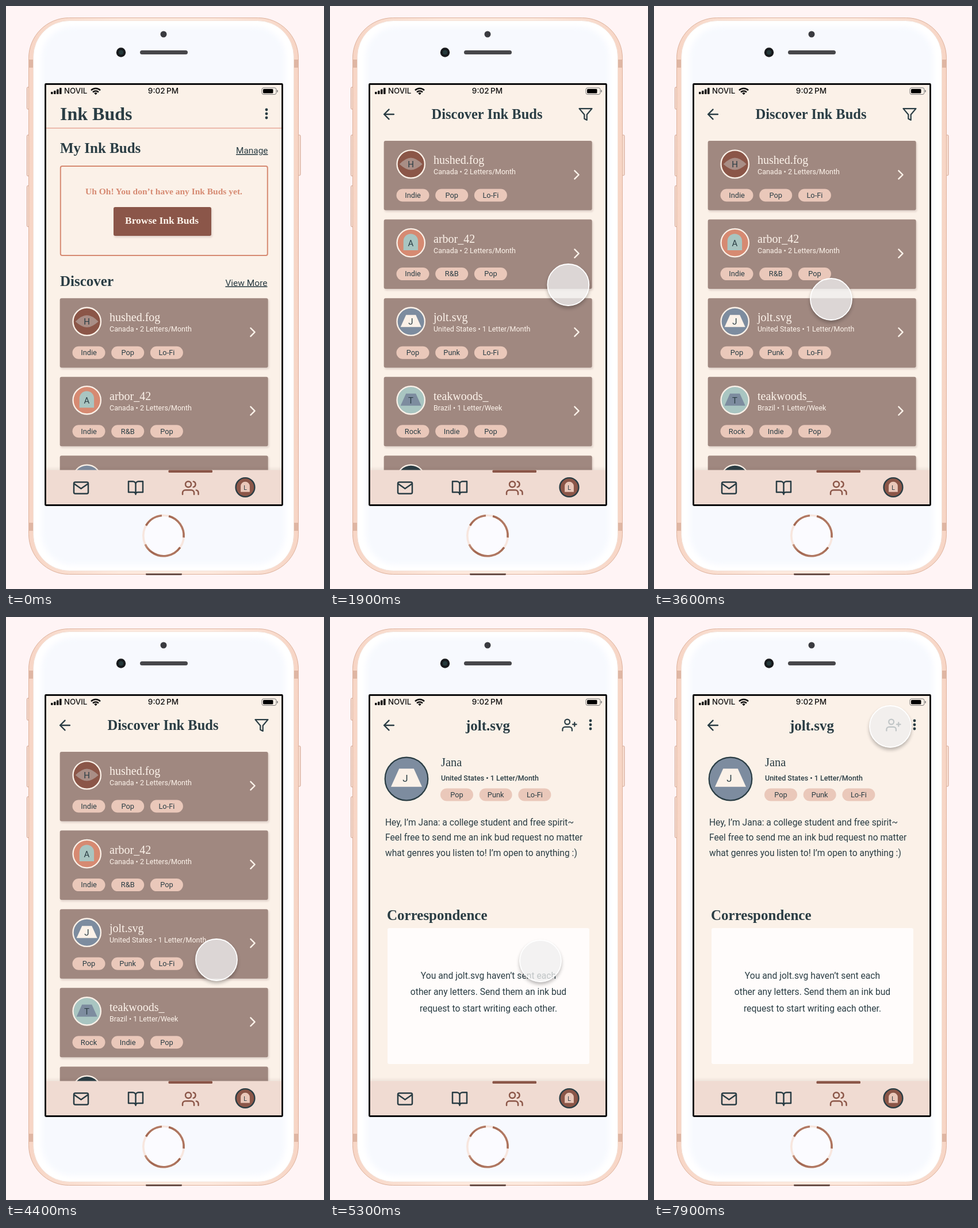
Animation of 553x1012 px, one loop 8 s. Source, as an HTML page:

```html
<!DOCTYPE html>
<html lang="en">
<head>
<meta charset="utf-8">
<title>Letter app prototype</title>
<style>
html, body { margin: 0; width: 100%; height: 100%; overflow: hidden; background: #fff4f5; }
svg { display: block; width: 100vw; height: 100vh; }
text { font-family: Roboto, sans-serif; }
.serif { font-family: "Liberation Serif", serif; }
.bold { font-weight: 700; }
.medium { font-weight: 500; }
.status { font-family: Inter, sans-serif; font-weight: 500; }
.icon { fill: none; stroke-width: 2; stroke-linecap: round; stroke-linejoin: round; }
</style>
</head>
<body>
<svg id="stage" viewBox="0 0 553 1012"></svg>
<script>
const DARK = '#2a3d44', BROWN = '#8b5648', CREAM = '#fbf1e8', CORAL = '#d68a72',
      BLUE = '#7d8c9f', TEAL = '#a9c5c1', TAUPE = '#a08880', PEACH = '#eac8ba';
const LOOP = 8000, PITCH = 136.6, FIRST_CARD = 234;

const rect = (x, y, w, h, r, fill, more = '') =>
  `<rect x="${x}" y="${y}" width="${w}" height="${h}" rx="${r}" fill="${fill}" ${more}/>`;
const circle = (x, y, r, fill, more = '') =>
  `<circle cx="${x}" cy="${y}" r="${r}" fill="${fill}" ${more}/>`;
const text = (x, y, size, str, fill = DARK, more = '') =>
  `<text x="${x}" y="${y}" font-size="${size}" fill="${fill}" ${more}>${str}</text>`;
const MID = 'text-anchor="middle"', END = 'text-anchor="end" text-decoration="underline"';
const HEAD = 'class="serif bold"', HEAD_MID = `${HEAD} ${MID}`;

// Line icons are drawn on a 24-unit grid around their centre.
const icons = {
  mail: 'M4 4h16a2 2 0 0 1 2 2v12a2 2 0 0 1-2 2H4a2 2 0 0 1-2-2V6a2 2 0 0 1 2-2zM22 6l-10 7L2 6',
  book: 'M2 3h6a4 4 0 0 1 4 4v14a3 3 0 0 0-3-3H2zM22 3h-6a4 4 0 0 0-4 4v14a3 3 0 0 1 3-3h7z',
  users: 'M17 21v-2a4 4 0 0 0-4-4H5a4 4 0 0 0-4 4v2M13 7a4 4 0 1 1-8 0a4 4 0 1 1 8 0M23 21v-2a4 4 0 0 0-3-3.87M16 3.13a4 4 0 0 1 0 7.75',
  back: 'M19 12H5M12 19l-7-7 7-7',
  filter: 'M22 3H2l8 9.46V19l4 2v-8.54z',
  add: 'M16 21v-2a4 4 0 0 0-4-4H5a4 4 0 0 0-4 4v2M12.5 7a4 4 0 1 1-8 0a4 4 0 1 1 8 0M20 8v6M23 11h-6',
  next: 'M9 18l6-6-6-6'
};
const icon = (name, x, y, scale, color = DARK) =>
  `<path class="icon" d="${icons[name]}" stroke="${color}" transform="translate(${x} ${y}) scale(${scale}) translate(-12 -12)"/>`;
const dots = [180, 187, 194].map(y => circle(453, y, 2.4, DARK)).join('');

const shapes = {
  lens: 'M-20 0Q-9-11 0-11T20 0Q9 10 0 10T-20 0z',
  arch: 'M-13 13V-3a12.7 12.7 0 0 1 25.4 0V13z',
  trapezoid: 'M-8.5-11.5H8.5L18 9.5H-18z'
};
const shape = (name, x, y, fill, scale = 1) =>
  `<path d="${shapes[name]}" fill="${fill}" transform="translate(${x} ${y}) scale(${scale})"/>`;

const tags = (names, x, y) => names.map((name, i) =>
  rect(x + i * 67.7, y, 57, 22, 11, PEACH) +
  text(x + i * 67.7 + 28.5, y + 15.4, 12.8, name, DARK, MID)).join('');

const people = [
  { name: 'hushed.fog', info: 'Canada • 2 Letters/Month', tags: ['Indie', 'Pop', 'Lo-Fi'], letter: 'H', bg: BROWN, shape: 'lens', fg: '#a98e86' },
  { name: 'arbor_42', info: 'Canada • 2 Letters/Month', tags: ['Indie', 'R&amp;B', 'Pop'], letter: 'A', bg: CORAL, shape: 'arch', fg: TEAL },
  { name: 'jolt.svg', info: 'United States • 1 Letter/Month', tags: ['Pop', 'Punk', 'Lo-Fi'], letter: 'J', bg: BLUE, shape: 'trapezoid', fg: CREAM },
  { name: 'teakwoods_', info: 'Brazil • 1 Letter/Week', tags: ['Rock', 'Indie', 'Pop'], letter: 'T', bg: TEAL, shape: 'trapezoid', fg: BLUE },
  { name: '', info: '', tags: [], letter: '', bg: DARK, shape: 'arch', fg: DARK }
];

const card = (p, slot) => `<g transform="translate(0 ${FIRST_CARD + slot * PITCH})">` +
  rect(93.7, 0, 362, 120.5, 3, TAUPE, 'filter="url(#soft)"') +
  circle(140.7, 40.5, 24.2, p.bg, `stroke="${CREAM}" stroke-width="2.3"`) +
  shape(p.shape, 140.7, 40.5, p.fg) +
  text(140.5, 46, 15, p.letter, DARK, MID) +
  text(180, 40, 20, p.name, '#fdf3ea', 'class="serif"') +
  text(180, 58, 12.5, p.info, '#fdf3ea') +
  icon('next', 429, 59, 1.2, '#fdf3ea') + tags(p.tags, 115.5, 83.5) + '</g>';

const home =
  text(94, 197.5, 32, 'Ink Buds', DARK, HEAD) + dots +
  rect(70, 211, 410, 2, 0, '#ecbaac') +
  text(94, 255, 25, 'My Ink Buds', DARK, HEAD) +
  text(455.5, 256, 15.4, 'Manage', DARK, END) +
  rect(94.8, 278, 360, 155, 3, 'none', `stroke="${CORAL}" stroke-width="2"`) +
  text(274.5, 327, 15.5, 'Uh Oh! You don’t have any Ink Buds yet.', CORAL, HEAD_MID) +
  rect(187, 349, 170, 50, 3, BROWN, 'filter="url(#soft)"') +
  text(271, 378, 17.5, 'Browse Ink Buds', '#fff5ec', HEAD_MID) +
  text(94, 486, 25, 'Discover', DARK, HEAD) +
  text(454.5, 485.5, 15.5, 'View More', DARK, END) +
  people.slice(0, 3).map((p, i) => card(p, i + 2)).join('');

const discover =
  icon('back', 102.5, 188, 1.2) + icon('filter', 444.5, 188, 1.1) +
  text(273, 196, 24.5, 'Discover Ink Buds', DARK, HEAD_MID) +
  people.map(card).join('');

const jolt = people[2];
const profile =
  icon('back', 102.5, 188, 1.2) + icon('add', 416.5, 187.5, 1.1) + dots +
  text(274.5, 197, 25, jolt.name, DARK, HEAD_MID) +
  circle(133, 281, 37.3, BLUE, `stroke="${DARK}" stroke-width="2.2"`) +
  shape('trapezoid', 133, 280.5, CREAM, 1.5) + text(131, 286, 17, 'J', DARK, MID) +
  text(193, 259, 20.5, 'Jana', DARK, 'class="serif"') +
  text(193, 283.5, 12.5, jolt.info, DARK, 'class="medium"') + tags(jolt.tags, 192, 297.5) +
  ['Hey, I’m Jana: a college student and free spirit~',
   'Feel free to send me an ink bud request no matter',
   'what genres you listen to! I’m open to anything :)']
    .map((line, i) => text(96, 362 + i * 26.3, 15.6, line)).join('') +
  text(99, 526, 25, 'Correspondence', DARK, HEAD) +
  rect(100, 540, 351, 236, 3, '#fffcfb') +
  ['You and jolt.svg haven’t sent each',
   'other any letters. Send them an ink bud',
   'request to start writing each other.']
    .map((line, i) => text(275.5, 627.5 + i * 28.5, 15.7, line, DARK, MID)).join('');

const statusBar =
  [4, 6, 8.5, 11].map((h, i) => rect(78 + i * 5, 153 - h, 3.6, h, 1, '#111')).join('') +
  text(101, 152.3, 13.3, 'NOVIL', '#111', 'class="status"') +
  '<g fill="none" stroke="#111" stroke-width="2.5"><path d="M148 146.3a11.3 11.3 0 0 1 16 0M151 149.6a7 7 0 0 1 10 0"/></g>' +
  '<path d="M156 154.2l-2.7-2.8a3.8 3.8 0 0 1 5.4 0z" fill="#111"/>' +
  text(273.5, 152.3, 13.6, '9:02\u2009PM', '#111', `class="status" ${MID}`) +
  rect(445, 142, 25, 11.5, 3, 'none', 'stroke="#777" stroke-width="1"') +
  rect(447, 144, 17.5, 7.5, 1.5, '#000') + rect(471.3, 145.7, 1.5, 4, 0.7, '#777');

const nav =
  rect(70, 805.5, 410, 60.5, 0, '#f0dbd2', 'filter="url(#lift)"') +
  rect(282.5, 805.5, 76.5, 4.5, 1.5, BROWN) +
  icon('mail', 130.5, 836.5, 1.25) + icon('book', 225.5, 836.5, 1.25) +
  icon('users', 320.8, 836.5, 1.25, BROWN) +
  circle(416, 835.5, 16.4, BROWN, `stroke="${DARK}" stroke-width="2.4"`) +
  shape('arch', 416.2, 835.5, PEACH, 0.62) + text(416.2, 840, 10.5, 'L', DARK, MID);

const bands = [93, 897].map(y => rect(39, y, 8, 14, 0, '#dfb6a3') + rect(501, y, 8, 14, 0, '#dfb6a3')).join('');
const sideButtons = [[36.5, 141, 38], [36.5, 224, 71], [36.5, 312, 71], [508, 224, 70]]
  .map(([x, y, h]) => rect(x, y, 4, h, 1.5, '#fbe3d7', 'stroke="#c9957e" stroke-width=".9"')).join('');

// Metallic ring: a pale base with three shaded arcs, given in degrees clockwise from 3 o'clock.
const ringArc = (from, to) => circle(0, 0, 35.2, 'none',
  `stroke="url(#ring)" stroke-width="3.6" pathLength="360" stroke-dasharray="${to - from} 360" transform="translate(274 919.5) rotate(${from})"`);
const homeButton = circle(274, 919.5, 35.2, '#fbfbff', 'stroke="#f7e6de" stroke-width="3.6"') +
  ringArc(-150, -95) + ringArc(-75, 5) + ringArc(35, 155);

const phone = sideButtons +
  rect(243, 983, 63, 5, 2, '#5a443f') +
  rect(39.5, 20.5, 469, 966, 70, 'url(#rim)', 'stroke="#ddb29d" stroke-width="1"') + bands +
  rect(243, 985, 63, 2.5, 1, '#6c5048') +
  rect(47.5, 25.5, 453, 955, 63, '#fff', 'stroke="#f3e3da" stroke-width="1"') +
  rect(62, 36, 424, 934, 54, '#f7f9fe', 'filter="url(#blur)"') +
  circle(274, 49, 5.5, '#3a3b40') +
  circle(200, 80.5, 8.2, '#17191c') + circle(200, 80.5, 4, '#24383a') +
  rect(233, 77, 83, 7, 3.5, '#47474a') + homeButton;

const gradient = (id, attrs, colors) => `<linearGradient id="${id}" ${attrs}>` +
  colors.map((c, i) => `<stop offset="${i / (colors.length - 1)}" stop-color="${c}"/>`).join('') + '</linearGradient>';
const shadow = (id, dx, dy, blur, opacity) =>
  `<filter id="${id}" x="-30%" y="-30%" width="160%" height="160%"><feDropShadow dx="${dx}" dy="${dy}" stdDeviation="${blur}" flood-color="#4a302a" flood-opacity="${opacity}"/></filter>`;
// Shadow only, cut out under the shape so that the glass cursor stays bright.
const outerShadow = '<filter id="float" x="-30%" y="-30%" width="160%" height="160%">' +
  '<feGaussianBlur in="SourceAlpha" stdDeviation="3"/><feOffset dy="3.5"/>' +
  '<feComposite operator="out" in2="SourceAlpha"/></filter>';

const stage = document.getElementById('stage');
stage.innerHTML = '<defs>' +
  gradient('rim', 'x1="0" y1="0" x2="1" y2="0"', ['#f7d5c5', '#fde9de', '#fde9de', '#f7d5c5']) +
  gradient('ring', 'x1="0" y1="0" x2="1" y2="1"', ['#b07761', '#a0654f', '#dcae99', '#a0654f', '#c99580']) +
  shadow('soft', 1.5, 2.5, 1.6, 0.16) + shadow('lift', 0, -2, 2.5, 0.1) + outerShadow +
  '<filter id="blur"><feGaussianBlur stdDeviation="4"/></filter>' +
  '<clipPath id="display"><rect x="69" y="136" width="412" height="731"/></clipPath></defs>' +
  rect(0, 0, 553, 1012, 0, '#fff4f5') + phone +
  rect(68.5, 135.5, 412, 731, 1, CREAM) +
  '<g clip-path="url(#display)">' + statusBar +
  [home, discover, profile].map(page => `<g class="page">${page}</g>`).join('') + nav + '</g>' +
  rect(68.5, 135.5, 412, 731, 1, 'none', 'stroke="#0b0b0c" stroke-width="2.8"') +
  '<g id="cursor">' + circle(0, 0, 36.5, '#000', 'filter="url(#float)" opacity=".28"') +
  circle(0, 0, 36, '#f0efef', 'fill-opacity=".76" stroke="#fff" stroke-width="1.8"') + '</g>';

const pages = [...stage.querySelectorAll('.page')];
const cursor = document.getElementById('cursor');
const pageStarts = [0, 1900, 5300];
// time, x, y
const path = [
  [0, 600, 560], [150, 600, 560], [1150, 415, 484], [2400, 414, 484], [3500, 308, 509],
  [3650, 308, 509], [4400, 366, 595], [5300, 366, 597], [5900, 366, 597], [7300, 411, 190], [LOOP, 411, 190]
];
const ease = u => u * u * (3 - 2 * u);

function cursorAt(t) {
  const i = path.findIndex(point => point[0] > t);
  const [t0, x0, y0] = path[i - 1], [t1, x1, y1] = path[i];
  const k = ease((t - t0) / (t1 - t0));
  return [x0 + (x1 - x0) * k, y0 + (y1 - y0) * k];
}

function draw(now) {
  const t = now % LOOP;
  const current = pageStarts.filter(start => start <= t).length - 1;
  pages.forEach((page, i) => page.setAttribute('visibility', i === current ? 'visible' : 'hidden'));
  cursor.setAttribute('transform', `translate(${cursorAt(t)})`);
}

const start = performance.now();
function tick() {
  draw(performance.now() - start);
  requestAnimationFrame(tick);
}
tick();
</script>
</body>
</html>
```
